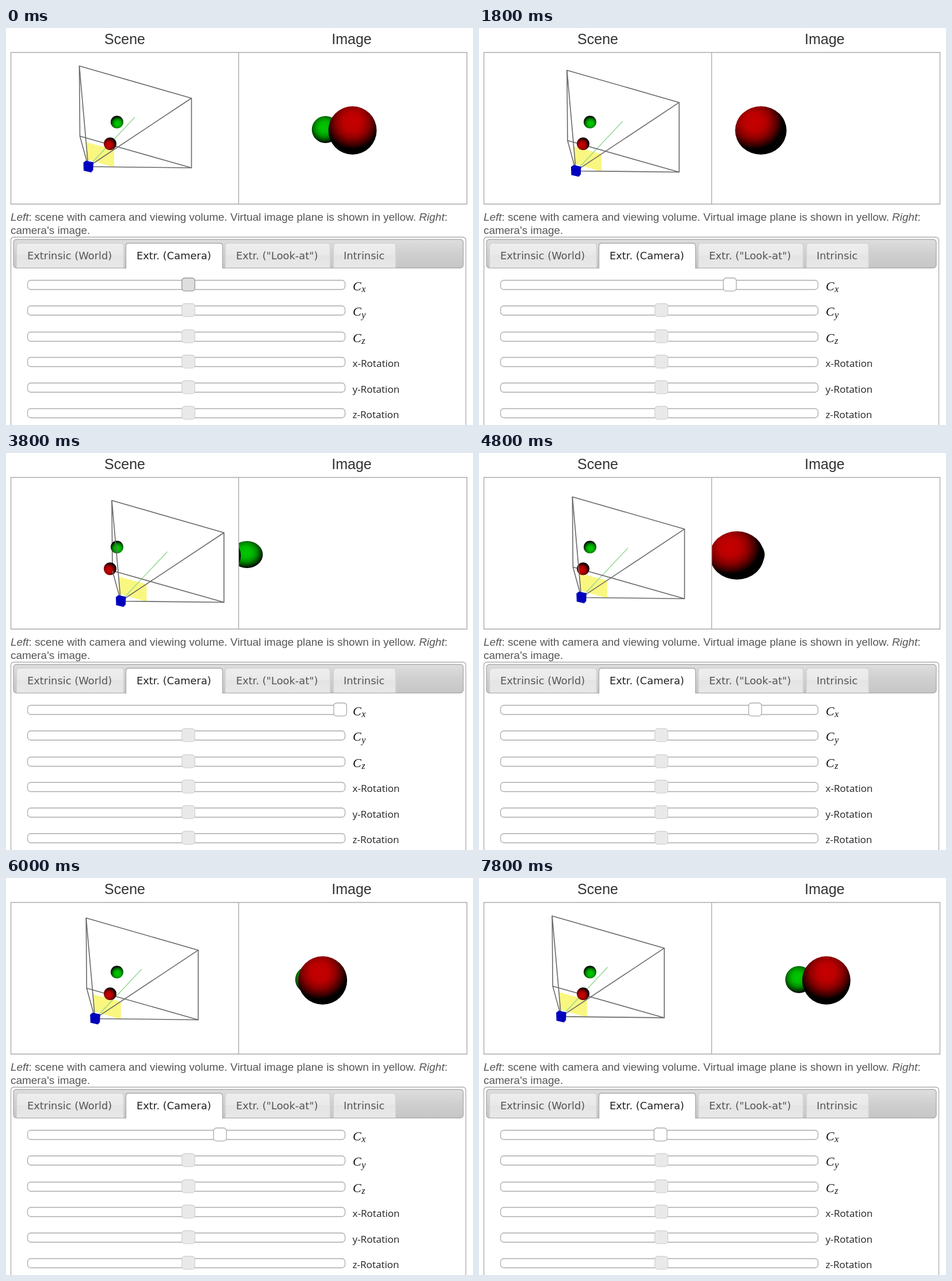
Write an HTML page that moves like this. It is 812 px wide and 690 px high and loops after 8000 ms.

```html
<!DOCTYPE html>
<html lang="en">
<head>
<meta charset="utf-8">
<title>Camera parameters</title>
<style>
html, body { margin: 0; width: 100%; height: 100%; overflow: hidden; background: #fff; }
svg { display: block; }
.head { font: 25px "Liberation Sans", Arial, sans-serif; fill: #333; text-anchor: middle; }
.note { font: 18.94px "Liberation Sans", Arial, sans-serif; fill: #555; }
.tab { font: 17.85px "DejaVu Sans", Verdana, sans-serif; fill: #555; }
.tab.on { fill: #212121; }
.label { font: 17.1px "Open Sans", "Noto Sans", sans-serif; fill: #222; }
.math { font: italic 22px "Liberation Serif", serif; fill: #111; }
.sub { font-size: 16px; }
.box { fill: none; stroke: #aaa; }
.wire { fill: none; stroke: #696969; stroke-width: 1.6; stroke-linejoin: round; }
.handle { fill: #e9e9e9; stroke: #d3d3d3; stroke-width: 1.3; }
.handle.hover { fill: #dedede; stroke: #999; }
.handle.active { fill: #fff; stroke: #aaa; }
</style>
</head>
<body>
<svg width="812" height="690" viewBox="0 0 812 690">
  <defs>
    <linearGradient id="bar" x2="0" y2="1">
      <stop stop-color="#dedede"/><stop offset=".5" stop-color="#cfcfcf"/><stop offset="1" stop-color="#c6c6c6"/>
    </linearGradient>
    <linearGradient id="idle" x2="0" y2="1">
      <stop stop-color="#eee"/><stop offset=".5" stop-color="#e9e9e9"/><stop offset=".5" stop-color="#e4e4e4"/><stop offset="1" stop-color="#e8e8e8"/>
    </linearGradient>
    <clipPath id="view"><rect x="405" y="43" width="396" height="263"/></clipPath>
  </defs>

  <text class="head" x="206.5" y="28">Scene</text>
  <text class="head" x="601" y="28">Image</text>

  <g class="cam">
    <path fill="#faf780" d="M139.5 198.5L188 211.5V242L139.5 228Z"/>
    <path stroke="#92d892" stroke-width="1.4" d="M143 241L224 155"/>
    <path class="wire" d="M127.5 66L322.5 122V243L128.5 188Z"/>
  </g>
  <g id="balls"></g>
  <g class="cam">
    <path class="wire" d="M127.5 66L143 241L322.5 122M128.5 188L143 241L322.5 243"/>
    <path fill="#0000bd" d="M134.5 234L139 230.5L152 233.5L151.5 247L148 251L135 248Z"/>
  </g>
  <g id="image" clip-path="url(#view)"></g>

  <path class="box" stroke-width="1.4" d="M8.5 42.5H801.5V306H8.5ZM404.5 42V306"/>

  <text class="note" x="8" y="335"><tspan font-style="italic">Left</tspan>: scene with camera and viewing volume. Virtual image plane is shown in yellow. <tspan font-style="italic">Right</tspan>:</text>
  <text class="note" x="8" y="358">camera's image.</text>

  <rect class="box" x="8.5" y="363.5" width="791" height="400" rx="5" stroke-width="1.3"/>
  <rect x="13" y="367.5" width="782" height="49.5" rx="5" fill="url(#bar)" stroke="#aaa" stroke-width="1.3"/>
  <g id="tabs"></g>
  <g id="rows"></g>
</svg>
<script>
const STEP = 200, LOOP = 8000, HOME = 317;
const byId = id => document.getElementById(id);

function add(parent, tag, attrs, text) {
  const el = document.createElementNS("http://www.w3.org/2000/svg", tag);
  for (const k in attrs) el.setAttribute(k, attrs[k]);
  if (text) el.textContent = text;
  parent.appendChild(el);
  return el;
}

function set(el, attrs) {
  for (const k in attrs) el.setAttribute(k, attrs[k]);
}

// Shaded ball: a radial gradient from its lit spot to a black rim
const tones = [[0, 1], [.35, .93], [.6, .7], [.85, .3], [1, 0]];
function ball(parent, id, isRed, light, attrs) {
  const grad = add(document.querySelector("defs"), "radialGradient", { id, ...light });
  for (const [offset, k] of tones) {
    const v = Math.round(200 * k);
    add(grad, "stop", { offset, "stop-color": isRed ? `rgb(${v},0,0)` : `rgb(0,${v},0)` });
  }
  return { el: add(parent, "ellipse", { ...attrs, fill: `url(#${id})` }), grad };
}

ball(byId("balls"), "g1", false, { cx: .55, cy: .62, r: .58 }, { cx: 193, cy: 163.5, rx: 11, ry: 11 });
ball(byId("balls"), "r1", true, { cx: .4, cy: .6, r: .58 }, { cx: 181, cy: 201.3, rx: 11, ry: 11 });

const green = ball(byId("image"), "g2", false, { cx: .46, cy: .42, r: .58 }, { cy: 176.5, ry: 23.5 });
const red = ball(byId("image"), "r2", true, { cx: .5, cy: .33, r: .56 }, { cy: 178, ry: 42 });

const tabs = [
  ["Extrinsic (World)", 18, 205, 37],
  ["Extr. (Camera)", 208, 377, 227],
  ['Extr. ("Look-at")', 381, 564, 400],
  ["Intrinsic", 569, 678, 587]
];
tabs.forEach(([name, l, r, x], i) => {
  const on = i === 1, foot = on ? 418 : 416.5;
  add(byId("tabs"), "path", {
    d: `M${l + .5} ${foot}V379q0 -5 5 -5H${r - 5.5}q5 0 5 5V${foot}`,
    fill: on ? "#fff" : "url(#idle)", stroke: on ? "#aaa" : "#d3d3d3", "stroke-width": 1.3
  });
  add(byId("tabs"), "text", { class: on ? "tab on" : "tab", x, y: 402 }, name);
});

const rows = byId("rows");
const handles = [446.5, 491, 536.5, 580.5, 625, 669.5].map((y, i) => {
  add(rows, "rect", { class: "box", x: 37.5, y: y - 8, width: 552, height: 16, rx: 5.5, "stroke-width": 1.3 });
  const axis = "xyz"[i % 3];
  if (i < 3) {
    const label = add(rows, "text", { class: "math", x: 603, y: y + 9 }, "C");
    add(label, "tspan", { class: "sub", dy: 3.5, dx: .5 }, axis);
  } else {
    add(rows, "text", { class: "label", x: 602.5, y: y + 8.5 }, axis + "-Rotation");
  }
  return add(rows, "rect", { class: "handle", x: HOME - 11.2, y: y - 12, width: 22.6, height: 22.6, rx: 5 });
});

// Slider position over time: [ms, x]
const drag = [
  [0, 317], [400, 318], [600, 328], [1400, 383], [1800, 436], [2600, 490],
  [3400, 589], [3600, 587], [3800, 581], [4200, 548], [4800, 480], [5000, 469],
  [5200, 454], [6000, 372], [6200, 350], [6600, 316], [6800, 315.5], [LOOP, 315.5]
];
function sliderAt(t) {
  const i = drag.findIndex(k => k[0] > t);
  const [t0, x0] = drag[i - 1], [t1, x1] = drag[i];
  return x0 + (x1 - x0) * (t - t0) / (t1 - t0);
}

// Perspective widens balls away from the optical axis
function place(b, cx, radius) {
  const off = cx - 604;
  set(b.el, { cx, rx: radius * (1 + 5e-6 * off * off) });
}

const cams = document.querySelectorAll(".cam");
function draw(t) {
  const x = sliderAt(t), d = x - HOME;
  cams.forEach(g => set(g, { transform: `translate(${d * .214} ${d * .0625})` }));
  place(red, 602.5 - d * .945, 42);
  place(green, 555.5 - d * .517, 23.5);
  set(red.grad, { cx: .5 - .13 * Math.min(1, Math.max(0, d / 120)) });
  const pressed = t >= 400 && t < 6800 || t >= 7800;
  set(handles[0], { x: x - 11.2, class: "handle " + (pressed ? "active" : "hover") });
  set(handles[1], { class: t === 7000 ? "handle hover" : "handle" });
}

function tick() {
  draw(Math.floor(performance.now() % LOOP / STEP) * STEP);
  requestAnimationFrame(tick);
}
tick();
</script>
</body>
</html>
```
